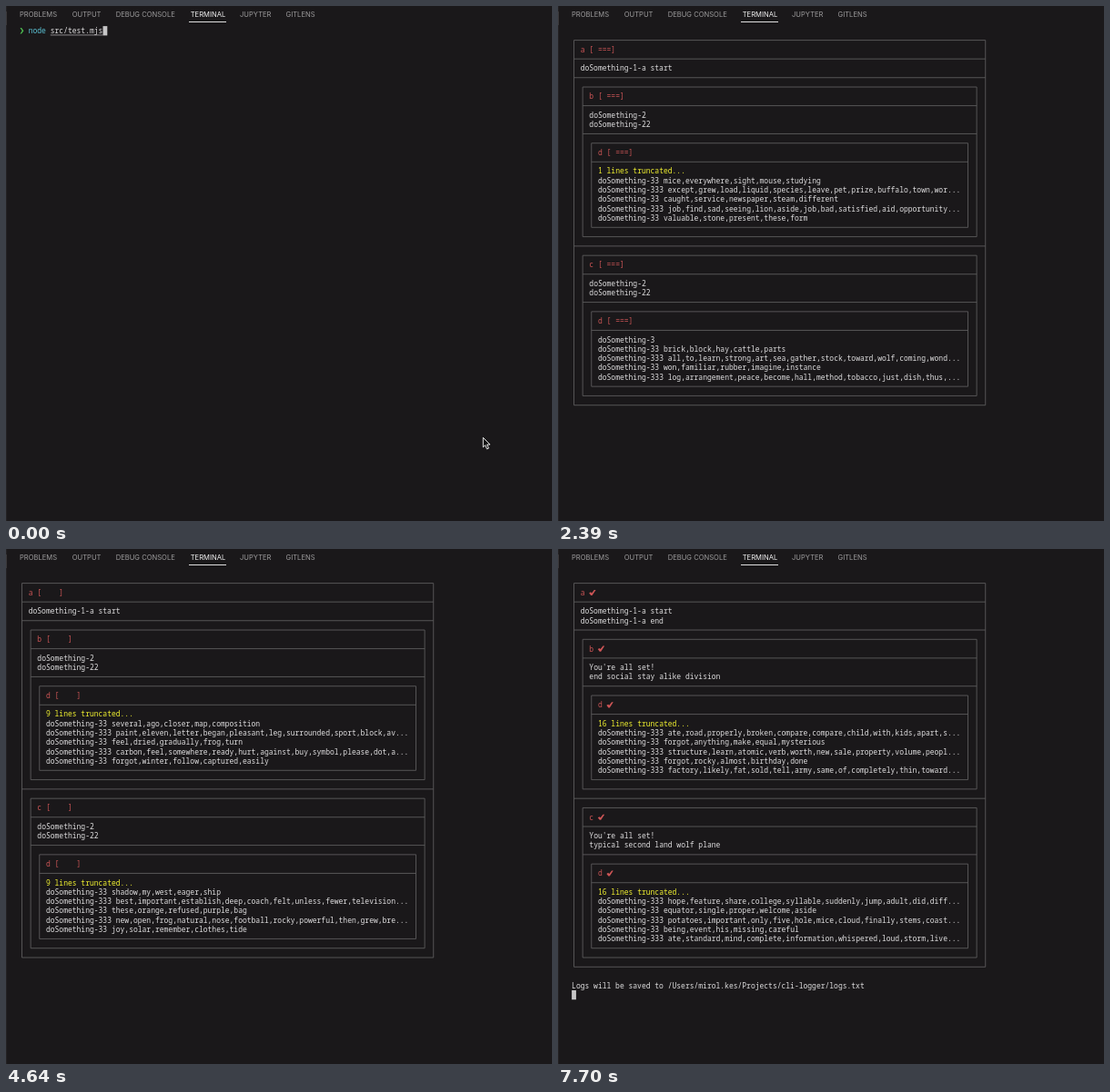
Write an HTML page that moves like this. It is 600 by 566 pixels and loops after 7730 ms.

```html
<!DOCTYPE html>
<html lang="en">
<head>
<meta charset="utf-8">
<title>Nested task log</title>
<style>
html, body { margin: 0; width: 100%; height: 100%; overflow: hidden; background: #1a181a; }
svg { display: block; width: 600px; height: 566px; }
text { white-space: pre; }
.tab { font: 7.6px Inter, "Liberation Sans", sans-serif; fill: #9d9c9d; }
.tab.on { fill: #f4f4f4; }
#term { font: 500 8.018px "Noto Sans Mono", "DejaVu Sans Mono", monospace; font-variant-ligatures: none; fill: #e0dfe0; }
.line { stroke: #5d5c5d; stroke-width: .9; fill: none; }
.red { fill: #cd5556; }
.yellow { fill: #f2f230; }
.green { fill: #4fc052; }
.cyan { fill: #5cc5d8; }
.block { fill: #c6c5c6; }
</style>
</head>
<body>
<svg viewBox="0 0 600 566">
  <rect width="600" height="566" fill="#1a181a"/>
  <rect width="1" height="566" fill="#242224"/>
  <rect y="6" width="1" height="15" fill="#3a383a"/>
  <g id="tabs"></g>
  <path d="M201 17.5h41" stroke="#dedede"/>
  <g id="term"></g>
  <path id="mouse" d="M524.3 474.3v10.6l2.4-2.2 1.8 4.2 1.9-.8-1.8-4.1h3.3z"
    fill="#111" stroke="#fff" stroke-width=".9" stroke-linejoin="round"/>
</svg>
<script>
const LOOP = 7730, CW = 4.811, LH = 10.285, TOP = 37.6;
const ENTER = 480, BOX = 610, KIDS = 700, END = 7090;
const term = document.getElementById('term');
const mouse = document.getElementById('mouse');

document.getElementById('tabs').innerHTML = [
  ['PROBLEMS', 15], ['OUTPUT', 72.7], ['DEBUG CONSOLE', 120.7],
  ['TERMINAL', 202.7], ['JUPYTER', 257], ['GITLENS', 307.5]
].map(([s, x]) => `<text class="tab${s === 'TERMINAL' ? ' on' : ''}" x="${x}" y="11.5">${s}</text>`).join('');

const BAR = ['    ', '=   ', '==  ', '=== ', ' ===', '  ==', '   =', '    ',
  '   =', '  ==', ' ===', '====', '=== ', '==  ', '=   '];

// Word lists alternate short and long; long ones are cut off.
const makeLines = words => ['doSomething-3', ...words.trim().split(/\s+/).map((w, i) =>
  i % 2 ? `doSomething-333 ${w}...` : `doSomething-33 ${w}`)];

const tasks = [
  {
    name: 'b', done: 5900, result: 'end social stay alike division',
    times: [800, 1050, 1400, 1600, 2150, 2330, 2600, 2800, 3050, 3300, 3850, 3850,
      4250, 4250, 4760, 4900, 5050, 5220, 5380, 5560, 5740],
    lines: makeLines(`
      mice,everywhere,sight,mouse,studying
      except,grew,load,liquid,species,leave,pet,prize,buffalo,town,wor
      caught,service,newspaper,steam,different
      job,find,sad,seeing,lion,aside,job,bad,satisfied,aid,opportunity
      valuable,stone,present,these,form
      large,command,game,sad,swim,actually,hunt,inch,include,than,post
      foreign,glad,lose,pond,bear
      silver,ground,market,plane,planned,court,yellow,cause,slip,metal
      several,ago,closer,map,composition
      paint,eleven,letter,began,pleasant,leg,surrounded,sport,block,av
      feel,dried,gradually,frog,turn
      carbon,feel,somewhere,ready,hurt,against,buy,symbol,please,dot,a
      forgot,winter,follow,captured,easily
      region,able,tip,taken,substance,did,prize,wild,package,industria
      toy,soldier,model,careful,group
      ate,road,properly,broken,compare,compare,child,with,kids,apart,s
      forgot,anything,make,equal,mysterious
      structure,learn,atomic,verb,worth,new,sale,property,volume,peopl
      forgot,rocky,almost,birthday,done
      factory,likely,fat,sold,tell,army,same,of,completely,thin,toward`)
  },
  {
    name: 'c', done: 6820, result: 'typical second land wolf plane',
    times: [830, 1080, 1430, 1640, 2200, 2400, 2650, 2830, 3100, 3400, 3750, 3750,
      4150, 4150, 4800, 5150, 5600, 5800, 6050, 6300, 6600],
    lines: makeLines(`
      brick,block,hay,cattle,parts
      all,to,learn,strong,art,sea,gather,stock,toward,wolf,coming,wond
      won,familiar,rubber,imagine,instance
      log,arrangement,peace,become,hall,method,tobacco,just,dish,thus,
      indicate,written,scared,farmer,job
      try,raise,north,attention,stared,moon,only,quiet,speak,daily,wri
      flat,hold,corner,pattern,human
      window,branch,simple,listen,bottle,giant,finger,travel,key,lucky
      shadow,my,west,eager,ship
      best,important,establish,deep,coach,felt,unless,fewer,television
      these,orange,refused,purple,bag
      new,open,frog,natural,nose,football,rocky,powerful,then,grew,bre
      joy,solar,remember,clothes,tide
      grandmother,year,class,term,somebody,hurry,species,additional,or
      worth,with,stranger,strip,itself
      hope,feature,share,college,syllable,suddenly,jump,adult,did,diff
      equator,single,proper,welcome,aside
      potatoes,important,only,five,hole,mice,cloud,finally,stems,coast
      being,event,his,missing,careful
      ate,standard,mind,complete,information,whispered,loud,storm,live`)
  }
];

const colX = c => 15.1 + c * CW;
const rowY = r => TOP + (r - 1) * LH;
const midX = c => colX(c + .5).toFixed(2);
const midY = r => rowY(r).toFixed(2);

const put = (s, c, r, cls = '') =>
  `<text class="${cls}" x="${colX(c).toFixed(2)}" y="${(rowY(r) + 2.9).toFixed(2)}">${s}</text>`;
const block = (c, r) =>
  `<rect class="block" x="${colX(c)}" y="${rowY(r) - 5.2}" width="${CW}" height="${LH}"/>`;
const rule = (c1, c2, r) => `<path class="line" d="M${midX(c1)} ${midY(r)}H${midX(c2)}"/>`;
const frame = (c1, c2, r1, r2) =>
  `<path class="line" d="M${midX(c1)} ${midY(r1)}H${midX(c2)}V${midY(r2)}H${midX(c1)}Z"/>`;
const check = (c, r) =>
  `<path class="red" transform="translate(${colX(c)} ${rowY(r)})" d="M-.2.5 1.6-.6 2.7.5 5.4-3H7.2L3.2 3.1H1.8Z"/>`;

function barAt(t) {
  if (t > 4640 && t < 4730) t = 4640;
  if (t > 6850) t = 6850 + Math.max(0, t - 6970);
  const i = Math.floor(6.17 + (t - 1700) / 53.7);
  return BAR[((i % 15) + 15) % 15];
}

const title = (name, c, r, done, t) => done
  ? put(name, c, r, 'red') + check(c + 2, r)
  : put(`${name} [${barAt(t)}]`, c, r, 'red');

// Boxed section with title and lines; inner(row) adds a child and returns its last row.
function section(name, left, right, top, lines, done, t, inner) {
  let out = title(name, left + 2, top + 1, done, t) + rule(left, right, top + 2);
  let r = top + 3;
  for (const [s, cls] of lines) out += put(s, left + 2, r++, cls);
  if (inner) {
    out += rule(left, right, r);
    const kid = inner(r + 1);
    out += kid.out;
    r = kid.end + 1;
  }
  return { out: out + frame(left, right, top, r), end: r };
}

const shown = (task, t) => task.lines.filter((_, i) => task.times[i] <= t);

function taskBox(task, right, top, t) {
  const done = t >= task.done;
  const text = done ? ["You're all set!", task.result] : ['doSomething-2', 'doSomething-22'];
  const log = shown(task, t);
  const tail = log.slice(-5).map(s => [s]);
  if (log.length > 5) tail.unshift([`${log.length - 5} lines truncated...`, 'yellow']);
  const inner = log.length
    ? r => section('d', 4, right - 4, r, tail, done, t)
    : null;
  return section(task.name, 2, right - 2, top, text.map(s => [s]), done, t, inner);
}

function promptView(t) {
  const cmd = 'src/test.mjs';
  const y = rowY(0) + 4.6;
  return `<path transform="translate(15.3 ${rowY(0)})" d="M.2-3.2H1.7L4.1 0 1.7 3.2H.2L2.4 0Z" class="green"/>` +
    put('node', 2, 0, 'cyan') + put(cmd, 7, 0) +
    `<path d="M${colX(7)} ${y}H${colX(19)}" stroke="#bdbcbd" stroke-width=".7"/>` +
    (t < ENTER ? block(19, 0) : block(0, 1));
}

function logView(t) {
  const done = t >= END;
  const widest = Math.max(0, ...tasks.flatMap(k => shown(k, t).map(s => s.length)));
  const right = Math.max(24, 11 + widest);
  const lines = [['doSomething-1-a start']];
  if (done) lines.push(['doSomething-1-a end']);
  const kids = r => {
    const b = taskBox(tasks[0], right, r, t);
    const c = taskBox(tasks[1], right, b.end + 2, t);
    return { out: b.out + rule(0, right, b.end + 1) + c.out, end: c.end };
  };
  const a = section('a', 0, right, 1, lines, done, t, t >= KIDS ? kids : null);
  return a.out + (done
    ? put('Logs will be saved to /Users/mirol.kes/Projects/cli-logger/logs.txt', 0, a.end + 2) + block(0, a.end + 3)
    : '');
}

let last = '';
function draw(t) {
  const view = t < BOX ? promptView(t) : logView(t);
  if (view !== last) term.innerHTML = last = view;
  mouse.style.display = t < ENTER ? '' : 'none';
}

const start = performance.now();
function tick(now) {
  draw(Math.max(0, now - start) % LOOP);
  requestAnimationFrame(tick);
}
draw(0);
requestAnimationFrame(tick);
</script>
</body>
</html>
```
